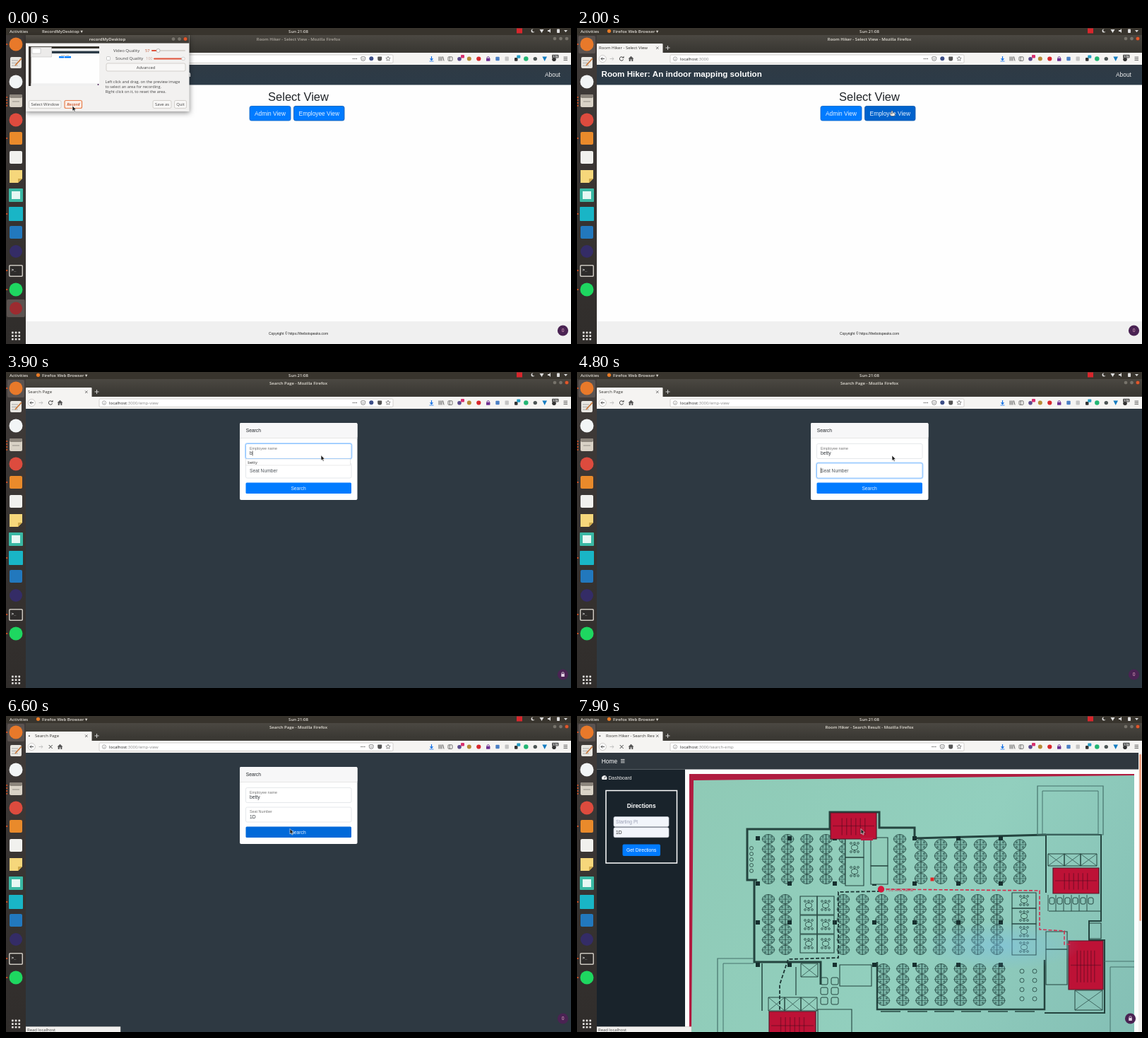
An HTML page with a canvas for the animation above (8000 ms loop, 800 px wide and 447 px high).

```html
<!DOCTYPE html>
<html lang="en">
<head>
<meta charset="utf-8">
<title>Indoor mapping demo</title>
<style>
html, body { margin: 0; width: 100%; height: 100%; overflow: hidden; background: #fff; }
canvas { display: block; width: 800px; height: 447px; }
</style>
</head>
<body>
<canvas id="stage" width="800" height="447"></canvas>
<script>
const g = document.getElementById('stage').getContext('2d');
const LOOP = 8000, STEP = 100;
const UI = '"Open Sans", "Noto Sans", sans-serif';
const PAGE = '"Liberation Sans", Arial, sans-serif';
const APP = 'Room Hiker', NAME = 'betty', SEAT = '1D';
const BLUE = '#007bff';

// ---- helpers ----
function rect(x, y, w, h, fill, r = 0, stroke, lw = 1) {
  g.beginPath();
  if (r) g.roundRect(x, y, w, h, r); else g.rect(x, y, w, h);
  if (fill) { g.fillStyle = fill; g.fill(); }
  if (stroke) { g.strokeStyle = stroke; g.lineWidth = lw; g.stroke(); }
}
function disc(x, y, r, fill, stroke, lw = 1) {
  g.beginPath();
  g.arc(x, y, r, 0, 7);
  if (fill) { g.fillStyle = fill; g.fill(); }
  if (stroke) { g.strokeStyle = stroke; g.lineWidth = lw; g.stroke(); }
}
function line(pts, color, lw = 1, dash = []) {
  g.beginPath();
  for (let i = 0; i < pts.length; i += 2) g.lineTo(pts[i], pts[i + 1]);
  g.setLineDash(dash);
  g.strokeStyle = color; g.lineWidth = lw; g.stroke();
  g.setLineDash([]);
}
function poly(pts, fill) {
  g.beginPath();
  for (let i = 0; i < pts.length; i += 2) g.lineTo(pts[i], pts[i + 1]);
  g.closePath();
  g.fillStyle = fill; g.fill();
}
function text(s, x, y, size, color, { font = PAGE, weight = 400, align = 'left' } = {}) {
  g.font = `${weight} ${size}px ${font}`;
  g.fillStyle = color; g.textAlign = align;
  g.fillText(s, x, y);
}
const ui = (s, x, y, color, size = 6, weight = 400, align = 'left') =>
  text(s, x, y, size, color, { font: UI, weight, align });
const vGrad = (y0, y1, a, b) => {
  const k = g.createLinearGradient(0, y0, 0, y1);
  k.addColorStop(0, a); k.addColorStop(1, b);
  return k;
};

// ---- desktop ----
function topBar(recording) {
  rect(0, 0, 800, 10, '#38342d');
  ui('Activities', 5, 6.5, '#dedad4', 6, 600);
  if (recording) ui('RecordMyDesktop ▾', 51, 6.5, '#dedad4', 6, 600);
  else {
    disc(45.5, 4.3, 2.6, '#e87a25');
    ui('Firefox Web Browser ▾', 51, 6.5, '#dedad4', 6, 600);
  }
  ui('Sun 21:08', 414, 6.5, '#dedad4', 6, 600, 'center');
  rect(723, 0.5, 8, 7, '#d8262c');
  disc(746, 4, 2.5, '#ddd'); disc(747.4, 3.3, 2.2, '#38342d');
  poly([755.5, 2, 761.5, 2, 758.5, 7], '#ddd');
  poly([767, 3, 769, 3, 771, 1, 771, 7, 769, 5, 767, 5], '#ddd');
  rect(780, 1.5, 4, 5.5, '#ddd', 0.8);
  poly([790, 3, 795, 3, 792.5, 6], '#ddd');
}

function dock(recording) {
  rect(0, 10, 28, 437, vGrad(10, 447, '#403b39', '#302d2b'));
  if (!recording) rect(2, 11, 24, 25, '#5b5350', 2);
  disc(14, 23, 9.5, '#e8792a');
  rect(6, 41, 16, 16, '#e9e7e2', 2);
  for (let i = 0; i < 3; i++) line([8, 46 + i * 3.5, 17, 46 + i * 3.5], '#999', 0.8);
  line([13, 53, 22, 43], '#c9783a', 1.8);
  disc(14, 76, 9.5, '#f2f5f6');
  rect(5, 94, 18, 18, '#d9d2c6', 2);
  rect(5, 94, 18, 5, '#8c857c', 2);
  line([9, 104, 19, 104], '#a09a90', 1.2);
  disc(14, 130, 9.5, '#dd4b3e');
  rect(5, 147, 18, 18, '#e98a2b', 2);
  rect(5, 174, 18, 18, '#f1f1ee', 2);
  poly([5, 201, 23, 201, 23, 213, 17, 219, 5, 219], '#f6d77b');
  poly([23, 213, 17, 213, 17, 219], '#cfa94b');
  rect(4, 227, 20, 19, '#3ab8a4', 1);
  rect(8, 231, 12, 11, '#e6f7f3');
  rect(4, 253, 20, 20, '#19b5c6', 1);
  rect(5, 280, 18, 18, '#2278bd', 2);
  disc(14, 316, 9, '#342c66');
  rect(4, 335, 20, 17, '#c9c5bd', 2);
  rect(5.5, 336.5, 17, 14, '#2d2b2a', 1);
  text('>_', 7.5, 344, 6, '#eee', { weight: 700 });
  disc(14, 370, 9.5, '#1ed760');
  if (recording) {
    rect(1, 384, 26, 25, '#5b5350', 2);
    disc(14, 396.5, 9, '#9c2b30');
  }
  for (let i = 0; i < 9; i++) rect(8 + i % 3 * 4.7, 429.5 + (i / 3 | 0) * 4.7, 2.7, 2.7, '#e4e2df', 0.6);
  for (const y of [23, 156, 263, 343, 370]) disc(1.2, y, 1.1, '#e95420');
  for (const y of [98, 102, 106, 110]) disc(1.2, y, 0.9, '#e95420');
}

function windowButtons(x, y, gap, closeColor) {
  for (let i = 0; i < 3; i++) disc(x + i * gap, y, 2.8, i < 2 ? '#77736b' : closeColor, '#33302c', 0.5);
}

function browser(s) {
  rect(28, 10, 772, 26, vGrad(10, 30, '#4b4842', '#3b3934'));
  ui(s.title + ' - Mozilla Firefox', 414, 17.5, s.focus ? '#e3dfd6' : '#aca79e', 6, 600, 'center');
  windowButtons(777, 15, 8.5, s.focus ? '#e2582c' : '#77736b');

  // tab
  rect(28, 22, 93.5, 14, '#f5f4f2', 1);
  g.save();
  g.beginPath(); g.rect(28, 20, 82, 16); g.clip();
  ui(s.title, s.loading ? 41 : 31, 30.3, '#33322f');
  g.restore();
  if (s.loading) disc(33.5 + 1.5 * Math.sin(s.t / 160), 28.3, 1, '#555');
  line([112, 26.5, 115.5, 30], '#555', 0.8); line([115.5, 26.5, 112, 30], '#555', 0.8);
  line([125.5, 28, 131.5, 28], '#ddd', 0.9); line([128.5, 25, 128.5, 31], '#ddd', 0.9);

  // toolbar
  rect(28, 35, 772, 17, '#f5f4f2');
  disc(36.3, 43.5, 5, '#fff', '#b8b6b2', 0.7);
  line([39, 43.5, 34, 43.5, 36.2, 41.3], '#444', 0.9); line([34, 43.5, 36.2, 45.7], '#444', 0.9);
  line([46.5, 43.5, 52, 43.5, 49.8, 41.3], '#bbb', 0.9); line([52, 43.5, 49.8, 45.7], '#bbb', 0.9);
  if (s.loading) {
    line([60.7, 41, 65.7, 46], '#444'); line([65.7, 41, 60.7, 46], '#444');
  } else {
    g.beginPath(); g.arc(63, 43.5, 2.7, 0.3, 5.4);
    g.strokeStyle = '#444'; g.lineWidth = 1; g.stroke();
    poly([63.5, 42.6, 66.5, 42.6, 66.5, 39.7], '#444');
  }
  poly([72.5, 43.5, 76.5, 39.8, 80.5, 43.5, 79.3, 43.5, 79.3, 47, 73.7, 47, 73.7, 43.5], '#555');
  rect(75.8, 44.3, 1.5, 2.7, '#f5f4f2');

  // address field
  rect(132, 38, 416, 11.5, '#fff', 1.5, '#c9c7c3', 0.8);
  disc(139, 43.6, 2.7, null, '#888', 0.7);
  line([139, 43, 139, 45.2], '#888', 0.7);
  ui('localhost', 146, 45.8, '#222');
  ui(':3000' + s.path, 146 + g.measureText('localhost').width, 45.8, '#8a8a8a');
  const dx = s.loading ? 11.5 : 0;
  for (let i = 0; i < 3; i++) disc(491.5 + dx + i * 2.4, 43.5, 0.8, '#666');
  g.beginPath(); g.roundRect(502.8 + dx, 40.8, 5.8, 5.6, [0.8, 0.8, 2.8, 2.8]);
  g.strokeStyle = '#666'; g.lineWidth = 0.8; g.stroke();
  line([504.2 + dx, 43, 505.7 + dx, 44.4, 507.2 + dx, 43], '#666', 0.8);
  if (!s.loading) disc(517.3, 43.3, 3, '#3c4d86');
  g.beginPath(); g.roundRect(526.2, 40.6, 6, 6, [0.8, 0.8, 2.8, 2.8]);
  g.fillStyle = '#555'; g.fill();
  g.beginPath();
  for (let i = 0; i < 10; i++) {
    const a = i * Math.PI / 5 - Math.PI / 2, r = i % 2 ? 1.5 : 3.4;
    g.lineTo(541 + r * Math.cos(a), 43.5 + r * Math.sin(a));
  }
  g.closePath(); g.strokeStyle = '#666'; g.lineWidth = 0.7; g.stroke();

  // extensions
  line([602.5, 40, 602.5, 46], '#1673e6', 1.2); poly([599.8, 43.3, 605.2, 43.3, 602.5, 46.3], '#1673e6');
  line([599.5, 47, 605.5, 47], '#1673e6', 0.8);
  for (let i = 0; i < 3; i++) line([613 + i * 2, 40.5, 613 + i * 2, 46.5], '#555', 0.9);
  line([618.6, 40.5, 620, 46.5], '#555', 0.9);
  rect(626, 40.8, 6, 5.6, null, 1, '#555', 0.8); line([628.3, 41, 628.3, 46.4], '#555', 0.8);
  disc(642, 43.8, 2.8, '#5b4a8c'); rect(644, 38, 5, 4.5, '#d8306f', 1);
  disc(655.8, 43.5, 3, '#b68b35');
  disc(669.3, 43.5, 3.1, '#d8262c');
  rect(680, 42.8, 5.4, 4, '#6d2f91', 0.5); disc(682.7, 42.3, 1.7, null, '#6d2f91', 0.9);
  rect(693.3, 40.8, 5.4, 5.4, '#4a7fc5', 1);
  rect(706.5, 40.5, 5.4, 6, '#c4c4c4', 1);
  rect(720, 42, 4.5, 4.8, '#333', 1); rect(723.3, 38.4, 5, 4.4, '#249cc4', 1);
  disc(736.3, 43.5, 3.2, '#22b573');
  disc(749.3, 43.6, 2.7, '#4c5555');
  poly([759.4, 40.5, 766, 40.5, 762.7, 47], '#157cc1');
  disc(776, 44.3, 2.8, '#333'); rect(773, 37.8, 9.5, 4.8, '#555', 0.8);
  ui('178', 777.7, 41.8, '#fff', 4.2, 600, 'center');
  for (let i = 0; i < 3; i++) line([789.5, 41.2 + i * 2.2, 795, 41.2 + i * 2.2], '#555', 0.9);
}

// ---- pages ----
function footer(x, s, bg, w) {
  rect(x, 415, w, 32, bg);
  text(s, x + w / 2, 434, 5.05, '#222', { align: 'center' });
}

function selectPage(hover) {
  rect(28, 52, 772, 395, '#fefefe');
  rect(28, 52, 772, 28.5, vGrad(52, 80, '#2f3a44', '#2c3b48'));
  text(APP + ': An indoor mapping solution', 34.5, 69, 11.64, '#fff', { weight: 700 });
  text('About', 763, 69, 8.4, '#eee');
  text('Select View', 414, 103, 16.5, '#212529', { align: 'center' });
  rect(345, 110.5, 58, 20.5, BLUE, 2.5, '#0a63c4', 0.8);
  rect(407.5, 110.5, 71.5, 20.5, hover ? '#0062cc' : BLUE, 2.5, '#0a57ab', 0.8);
  text('Admin View', 374, 123.6, 8.35, '#e8f2ff', { align: 'center' });
  text('Employee View', 443.3, 123.6, 8.35, '#e8f2ff', { align: 'center' });
  footer(28, 'Copyright © https://thebotspeaks.com', '#f0f0f0', 772);
}

function field(y, label, value, focus, caret) {
  if (focus) rect(339.5, y, 149.5, 21, null, 2.5, 'rgba(0,123,255,.28)', 3);
  rect(339.5, y, 149.5, 21, '#fff', 2, focus ? '#80bdff' : '#dfe2e6', 0.8);
  if (value) {
    text(label, 345, y + 8, 5.4, '#777');
    text(value, 345, y + 15.8, 6.7, '#33383d');
  } else text(label, 345, y + 12.6, 6.7, '#4e555b');
  if (caret) {
    const x = 345.4 + (value ? g.measureText(value).width : 0);
    line([x, y + (value ? 10 : 6.5), x, y + (value ? 17 : 14)], '#222', 0.7);
  }
}

function dropdown(y, item, hot) {
  rect(339.5, y, 148, 9, hot ? '#ef7f4c' : '#fff', 0, '#d5d5d5', 0.5);
  ui(item, 342.3, y + 6.6, hot ? '#fff' : '#333', 5.7);
}

function searchPage(t) {
  const early = t < 3100;
  rect(28, 52, 772, 395, early ? '#3a393c' : '#2e3942');
  if (early) rect(260, 52, 540, 28.5, '#303b45');
  rect(331, 72, 166.5, 109, '#fff', 2);
  rect(331, 72, 166.5, 21.5, '#f7f7f8', 2);
  line([331, 93.5, 497.5, 93.5], '#dfdfdf', 0.7);
  text('Search', 339.7, 85.3, 6.7, '#212529');

  const nameKeys = [3800, 4000, 4100, 4300, 4400];
  const name = NAME.slice(0, nameKeys.filter(k => t >= k).length);
  const seat = SEAT.slice(0, [4900, 5200].filter(k => t >= k).length);
  const onSeat = t >= 4600 && t < 6400;
  field(101.5, 'Employee name', name, t >= 3700 && t < 4600, t < 4600);
  field(129, 'Seat Number', seat, onSeat, onSeat && t < 5500);
  rect(339.5, 156.5, 149.5, 15.5, t >= 6300 ? '#0069d9' : BLUE, 1.5);
  text('Search', 414, 166.7, 6.7, '#e6f1ff', { align: 'center' });
  if (name && t < 4500) dropdown(123, NAME);
  if (seat && t < 6000) dropdown(150.5, SEAT, t >= 5600);
}

function resultPage(ready) {
  rect(28, 52, 772, 395, ready ? '#fdfefe' : '#f9fefe');
  rect(28, 52, 772, 23.5, '#2f373e');
  text('Home', 34.7, 67, 8.4, '#fff');
  if (ready) for (let i = 0; i < 3; i++) line([62, 61.5 + i * 2.2, 67.5, 61.5 + i * 2.2], '#eee', 0.9);
  else { rect(63, 61, 4, 5.5, null, 0, '#ccc', 0.7); line([64, 64, 66, 64], '#ccc', 1); }

  rect(28, 75.5, 125, 371.5, '#19232b');
  if (ready) {
    g.beginPath(); g.arc(38.8, 88, 3.7, 2.6, 6.82); g.closePath();
    g.fillStyle = '#eee'; g.fill();
    line([38.8, 88.5, 40.3, 85.5], '#19232b', 0.8);
  }
  text('Dashboard', 44.5, 90, 6.75, '#eee');
  rect(41, 105.5, 100.5, 102.5, null, 0, '#fff', 1.5);
  text('Directions', 91.2, 130, 8.35, '#fff', { weight: 700, align: 'center' });
  rect(52, 142.5, 78, 14, '#f2f5fb', 2, '#c3c8d2', 0.7);
  rect(52, 157.7, 78, 14, '#f2f5fb', 2, '#c3c8d2', 0.7);
  text('Starting Pt', 55, 151.8, 6.7, '#9a9fb4');
  text(ready ? SEAT : 'End Pt', 55, 167, 6.7, ready ? '#333' : '#9a9fb4');
  rect(64.5, 181.5, 53.5, 16.5, BLUE, 2);
  text('Get Directions', 91.2, 192, 6.7, '#fff', { align: 'center' });
  if (ready) {
    floorPlan();
    rect(795, 52, 5, 395, '#f1f0ee');
    rect(796.3, 54, 2.6, 236, '#ef9a78', 1.3);
  } else {
    text('Map image', 159, 90, 6.7, '#222');
    footer(153, 'Copyright © https://thebotspeaks.com/ 2018', '#eff0f8', 647);
  }
}

// ---- floor plan ----
const INK = '#24443f', PAPER = '#90ccb9';

// a column of ring-shaped desk groups on a common spine
function desks(x, n, y0, y1, pitch = 27.2) {
  const rows = Math.round((y1 - y0) / 14.5), h = (y1 - y0) / rows;
  for (let i = 0; i < n; i++) {
    const cx = x + i * pitch;
    line([cx, y0, cx, y1], INK, 1);
    for (let r = 0; r < rows; r++) {
      const y = y0 + h * (r + 0.5);
      g.beginPath();
      g.ellipse(cx, y, 8.5, h * 0.46, 0, 0, 7);
      g.fillStyle = 'rgba(50,105,98,.22)'; g.fill();
      g.strokeStyle = 'rgba(36,68,63,.85)'; g.lineWidth = 1; g.stroke();
      line([cx - 9.5, y, cx + 9.5, y], 'rgba(36,68,63,.75)', 0.8);
      for (const d of [-1, 1])
        for (const v of [-1, 1]) disc(cx + d * 4.5, y + v * 3.3, 1.6, '#47776d');
    }
  }
}
function room(x, y, w, h, seats = true) {
  rect(x, y, w, h, null, 0, INK, 1.1);
  if (!seats) return;
  const cx = x + w / 2, cy = y + h / 2;
  rect(cx - 4.5, cy - 3.5, 9, 7, PAPER, 3, INK, 0.9);
  for (let i = 0; i < 6; i++) disc(cx - 5 + i % 3 * 5, cy + (i < 3 ? -6 : 6), 1.4, null, INK, 0.8);
}
function crossed(x, y, w, h) {
  rect(x, y, w, h, null, 0, INK, 1);
  line([x, y, x + w, y + h], INK, 0.7);
  line([x + w, y, x, y + h], INK, 0.7);
}
function core(x, y, w, h) {
  rect(x, y, w, h, '#bd1236', 0, '#571a2b', 1.2);
  const shade = 'rgba(70,8,28,.4)';
  for (let u = 0.25; u < 0.8; u += 0.1) line([x + w * u, y + h * 0.2, x + w * u, y + h * 0.85], shade, 1.5);
  line([x + 3, y + h * 0.5, x + w - 3, y + h * 0.5], shade, 1.5);
}

function floorPlan() {
  g.save();
  g.beginPath(); g.rect(159, 82, 630, 365); g.clip();
  const bg = g.createLinearGradient(159, 82, 789, 447);
  bg.addColorStop(0, '#8fcab6'); bg.addColorStop(0.55, '#92cfbe'); bg.addColorStop(1, '#84bfb5');
  rect(159, 82, 630, 365, bg);
  poly([159, 82, 789, 82, 789, 84, 165, 91, 162, 447, 159, 447], '#b01c40');

  // walls
  line([255, 232, 241, 232, 241, 160, 358, 160, 358, 136, 428, 136, 428, 158, 478, 158, 478, 173, 664, 168], INK, 3);
  line([251, 232, 251, 348, 345, 348, 345, 380], INK, 3);
  line([425, 348, 425, 415, 662, 415, 662, 345], INK, 2.5);
  line([664, 168, 664, 250], INK, 2);
  line([664, 168, 742, 168, 742, 290, 725, 290, 725, 317, 747, 317, 747, 420, 662, 420], INK, 2);
  rect(652, 99, 93, 69, null, 0, '#47736c', 1.2);
  rect(659, 106, 79, 61, null, 0, '#47736c', 1);
  line([250, 343, 199, 343, 199, 447], '#47736c', 1.2);
  line([250, 350, 207, 350, 207, 447], '#47736c', 1);
  line([747, 347, 789, 347], '#47736c', 1);
  line([789, 355, 755, 355, 755, 447], '#47736c', 1);
  for (let i = 0; i < 6; i++) line([430 + i * 38, 418, 458 + i * 38, 418], INK, 1.5);

  desks(271, 5, 167, 238);
  desks(457, 1, 167, 238);
  desks(487, 6, 174, 238, 28);
  desks(271, 2, 252, 338, 24);
  desks(377, 9, 252, 338);
  desks(434, 7, 350, 410);
  for (const x of [256, 301, 365, 421, 478, 540, 600])
    for (const y of [173, 237, 292, 352]) rect(x - 3, y - 3, 6, 6, '#17302f');

  // rooms
  rect(380, 172, 26, 68, PAPER);
  room(380, 172, 26, 28); room(380, 200, 26, 40);
  rect(416, 172, 24, 66, PAPER);
  room(416, 172, 24, 40, false); room(416, 212, 24, 26, false);
  for (let i = 0; i < 6; i++) room(316 + i % 2 * 24, 255 + (i / 2 | 0) * 27, 24, 26);
  for (let i = 0; i < 4; i++) room(616, 250 + i * 22, 34, 22);
  for (let i = 0; i < 5; i++) disc(247, 187 + i * 8, 2.5, null, INK, 0.8);
  for (let i = 0; i < 3; i++) {
    crossed(667 + i * 23, 195, 23, 17);
    crossed(271 + i * 23, 398, 23, 19);
  }
  crossed(705, 388, 39, 28);
  crossed(317, 350, 24, 19);
  for (let i = 0; i < 6; i++) {
    rect(669 + i * 11, 257, 7, 9, null, 2, INK, 1);
    line([667 + i * 11, 253, 667 + i * 11, 276], INK, 0.9);
    rect(345 + i % 2 * 15, 370 + (i / 2 | 0) * 14, 10, 10, null, 2, INK, 1);
  }
  line([668, 276, 742, 276], INK, 1.2);
  room(664, 305, 30, 25, false); room(664, 330, 30, 50, false);
  room(725, 293, 17, 22, false);
  room(372, 352, 45, 30, false); room(341, 415, 48, 35, false);
  for (let i = 0; i < 8; i++) disc(630 + i % 2 * 18, 361 + (i / 2 | 0) * 13, 3, null, INK, 0.8);
  line([262, 350, 262, 417], INK, 1.5);
  line([310, 355, 310, 395], INK, 1.2);

  core(359, 137, 65, 37);
  rect(402, 172, 17, 4, '#c01a42');
  core(674, 215, 65, 36);
  core(696, 318, 49, 69);
  core(272, 418, 66, 40);

  // routes
  line([430, 248, 370, 249, 370, 342, 299, 344, 287, 380, 287, 417], '#1d3735', 1.8, [5, 2.5]);
  line([430, 245, 655, 247, 655, 302, 690, 304, 690, 323, 700, 323], '#d52c4b', 1.6, [5, 2.5]);
  disc(430.5, 245, 4.7, '#d6163c');
  text('YOU ARE HERE', 437, 248, 5.2, '#c9284a');
  rect(500.5, 228.5, 5, 5, '#e02626');

  // reflected light
  g.translate(600, 325); g.scale(1, 0.3);
  const glare = g.createRadialGradient(0, 0, 5, 0, 0, 115);
  glare.addColorStop(0, 'rgba(120,190,235,.45)'); glare.addColorStop(1, 'rgba(120,190,235,0)');
  disc(0, 0, 115, glare);
  g.restore();
}

// ---- overlays ----
function button(x, y, w, h, s, hot) {
  rect(x, y, w, h, hot ? '#fbeee6' : '#f8f7f6', 2, hot ? '#e8804f' : '#c4c0bb', hot ? 1.2 : 0.7);
  text(s, x + w / 2, y + h / 2 + 2.1, 5.8, hot ? '#c8481c' : '#444',
    { font: UI, align: 'center', weight: hot ? 'italic 600' : 400 });
}

function recorder(alpha) {
  g.save();
  g.globalAlpha = alpha;
  g.shadowColor = 'rgba(0,0,0,.45)'; g.shadowBlur = 7; g.shadowOffsetY = 2;
  rect(28, 10, 231.5, 108, '#f2f1f0');
  g.shadowColor = 'transparent';
  rect(28, 10, 231.5, 11.5, vGrad(10, 21, '#55514a', '#3c3a35'));
  ui('recordMyDesktop', 143.5, 17.8, '#e8e4dc', 6, 600, 'center');
  windowButtons(237, 15.5, 8.5, '#e2582c');

  // preview
  rect(32, 26, 100, 56, '#fefefe');
  rect(32, 26, 100, 3, '#38352f');
  rect(32, 26, 3.5, 56, '#35302d');
  rect(65, 32.5, 67, 3.5, '#2d3c48');
  rect(35.5, 27, 29, 14, '#ecebea', 0, '#aaa', 0.4);
  rect(37, 29, 12, 7, '#fff', 0, '#999', 0.4);
  text('Select View', 83.5, 39, 2.3, '#333', { align: 'center' });
  rect(75, 40, 7.3, 2.4, BLUE); rect(83, 40, 9, 2.4, BLUE);
  rect(35.5, 78.2, 96.5, 3.8, '#f0f0f0');
  disc(130.5, 80, 1, '#4b2257');

  ui('Video Quality', 152, 34, '#444');
  ui('57', 197, 34, '#c0502c', 5.5);
  rect(206, 31, 48, 2, '#d9d5d0', 1); rect(206, 31, 10, 2, '#e0533a', 1);
  disc(215.5, 32, 2.6, '#f6f5f4', '#999', 0.6);
  rect(142.5, 40.5, 5, 5, '#fff', 1, '#aaa', 0.6);
  ui('Sound Quality', 155, 45.2, '#444');
  ui('100', 198, 45.2, '#c9a79a', 5.5);
  rect(209, 42.5, 42, 2, '#e0533a', 1);
  disc(251, 43.5, 2.4, '#f6f5f4', '#bbb', 0.6);
  button(142, 50, 112, 11, 'Advanced');
  ui('Left click and drag, on the preview image', 140.5, 78, '#444', 5.6);
  ui('to select an area for recording.', 140.5, 85, '#444', 5.6);
  ui('Right click on it, to reset the area.', 140.5, 92, '#444', 5.6);
  button(32.5, 102.5, 45.5, 11, 'Select Window');
  button(83, 102.5, 24.5, 11, 'Record', true);
  button(208, 102.5, 26, 11, 'Save as');
  button(238.5, 102.5, 17, 11, 'Quit');
  g.restore();
}

function badge(x, lock) {
  disc(x, 428, 7.6, '#4a2353');
  if (lock) {
    rect(x - 2.3, 427, 4.6, 4, '#e6d5e6', 0.6);
    disc(x, 426.3, 1.6, null, '#e6d5e6', 0.9);
  } else text('0', x, 430.4, 6.7, '#e3a7c0', { align: 'center' });
}

function status() {
  rect(28, 439.5, 134, 8, '#f1f0ee', 0, '#c4c2be', 0.5);
  ui('Read localhost', 30, 446, '#444', 5.9);
}

const moves = [
  [0, 94, 110], [1000, 94, 110], [1100, 174, 69], [1200, 174, 69], [1800, 446, 117],
  [5200, 446, 118], [5700, 381, 151], [6000, 381, 151], [6300, 402, 159.5], [LOOP, 402, 159.5]
];
function pointer(t) {
  const i = moves.findIndex(m => m[0] > t);
  const [a, x0, y0] = moves[i - 1], [b, x1, y1] = moves[i];
  const k = (t - a) / (b - a), e = k * k * (3 - 2 * k);
  const x = x0 + (x1 - x0) * e, y = y0 + (y1 - y0) * e;
  if (t >= 1800 && t < 2500) {
    rect(x - 2, y + 3, 6, 4.5, '#fff', 1.5, '#222', 0.5);
    rect(x - 0.8, y, 1.8, 5, '#fff', 0.8, '#222', 0.5);
    return;
  }
  g.beginPath();
  [[0, 0], [0, 7.5], [1.7, 6], [2.9, 8.6], [4.2, 8], [3, 5.5], [5.3, 5.3]].forEach(([u, v]) => g.lineTo(x + u, y + v));
  g.closePath();
  g.lineJoin = 'round';
  g.fillStyle = '#1c1c1c'; g.fill();
  g.strokeStyle = '#fff'; g.lineWidth = 0.6; g.stroke();
  g.lineJoin = 'miter';
}

// ---- timeline ----
function draw(t) {
  const page = t < 2600 ? 'select' : t < 6800 ? 'search' : 'result';
  const mapReady = t >= 7700;
  const s = {
    t,
    focus: t >= 500,
    loading: (t >= 2300 && t < 3200) || t >= 6500,
    title: { select: APP + ' - Select View', search: 'Search Page', result: APP + ' - Search Result' }[page],
    path: { select: '', search: '/emp-view', result: '/search-emp' }[page]
  };
  rect(0, 0, 800, 447, '#fff');
  browser(s);
  if (page === 'select') selectPage(t >= 1800);
  else if (page === 'search') searchPage(t);
  else resultPage(mapReady);
  badge(mapReady ? 783.5 : 788.5, page === 'result' || (t >= 2600 && t < 4600));
  if (s.loading) status();
  topBar(t < 300);
  dock(t < 400);
  if (t < 300) recorder(1 - t / 300);
  pointer(t);
}

const start = performance.now();
let shown = -1;
function tick(now) {
  const t = Math.floor(Math.max(0, now - start) % LOOP / STEP) * STEP;
  if (t !== shown) { draw(t); shown = t; }
  requestAnimationFrame(tick);
}
draw(0);
requestAnimationFrame(tick);
</script>
</body>
</html>
```
